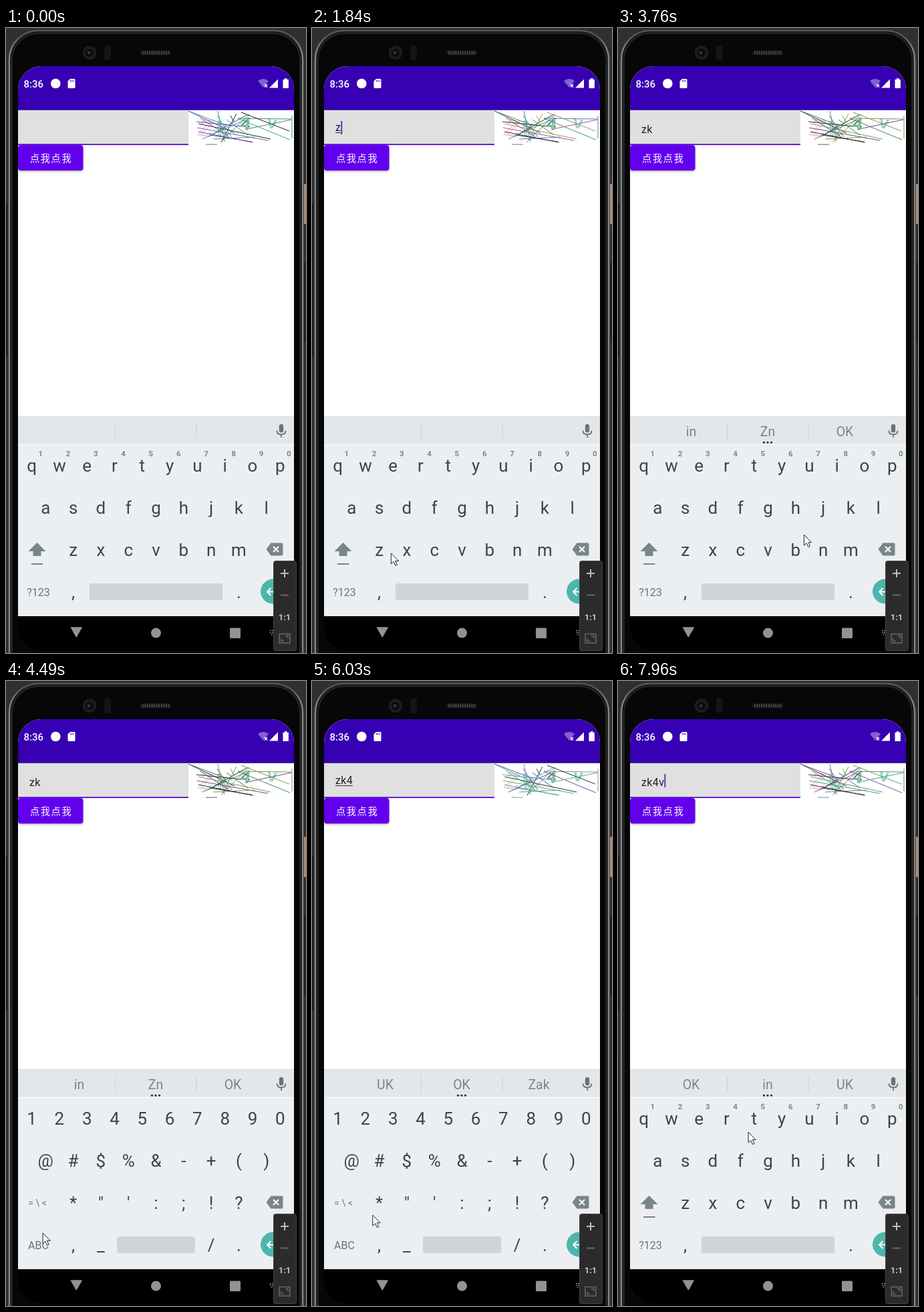
Write an HTML page that moves like this. It is 449x934 px and loops after 8000 ms.

```html
<!DOCTYPE html>
<html lang="zh">
<head>
<meta charset="utf-8">
<title>Verification code input</title>
<style>
html, body { margin: 0; width: 100%; height: 100%; overflow: hidden; background: #303032; }
svg { display: block; width: 449px; height: 934px; font-family: Roboto, sans-serif; }
.key { font-size: 26px; fill: #37474f; text-anchor: middle; }
.hint { font-size: 11.5px; font-weight: 600; fill: #7b868b; text-anchor: middle; }
.mode { font-size: 16px; fill: #69757b; text-anchor: middle; }
.sug { font-size: 19.5px; fill: #7a8387; text-anchor: middle; }
.input { font-size: 16px; letter-spacing: .4px; fill: #202020; }
</style>
</head>
<body>
<svg viewBox="0 0 449 934">
  <defs>
    <linearGradient id="rim" x2="1" y2="0">
      <stop offset="0" stop-color="#858585"/><stop offset=".04" stop-color="#555"/>
      <stop offset=".96" stop-color="#555"/><stop offset="1" stop-color="#858585"/>
    </linearGradient>
    <clipPath id="screen"><rect x="18" y="57" width="413" height="873" rx="35"/></clipPath>
    <filter id="lift" x="-20%" y="-20%" width="140%" height="140%">
      <feDropShadow dx="0" dy="1.5" stdDeviation="1.5" flood-opacity=".3"/>
    </filter>
  </defs>

  <!-- device -->
  <rect width="449" height="934" fill="#303032"/>
  <rect x="446" y="233" width="3" height="60" fill="#b08e78"/>
  <path d="M447.5 350v120M1 262v230" stroke="#1b1b1c" stroke-width="2"/>
  <rect x="5" y="4" width="439" height="980" rx="43" fill="#070707" stroke="url(#rim)" stroke-width="2.5"/>
  <rect x="8.5" y="7.5" width="432" height="973" rx="40" fill="none" stroke="#222" stroke-width="3"/>
  <circle cx="125" cy="37" r="10.5" fill="#1c1c1d"/>
  <circle cx="125" cy="37" r="6" fill="#0c0c0e"/>
  <circle cx="124" cy="37" r="2.3" fill="#35373b"/>
  <rect x="147" y="26" width="10" height="22" rx="4" fill="#151516"/>
  <rect x="201" y="33.5" width="46" height="7" rx="3.5" fill="#1a1a1a"/>
  <path d="M204 37h41" stroke="#4b4b4b" stroke-width="5" stroke-dasharray="1.5 2"/>

  <g clip-path="url(#screen)">
    <rect x="18" y="57" width="413" height="822" fill="#fff"/>
    <rect x="18" y="57" width="413" height="65.5" fill="#3700b3"/>
    <path d="M18 122h413" stroke="#2c0794"/>
    <text x="26.5" y="89" font-size="15" font-weight="500" fill="#fff">8:36</text>
    <circle cx="74.3" cy="83" r="7.3" fill="#fff"/>
    <path d="M96 76h6q1.5 0 1.5 1.500v11q0 1.500-1.500 1.500h-8q-1.500 0-1.500-1.500v-9z" fill="#fff"/>
    <path d="M96.500 78v2.500M98.700 78v2.500M101 78v2.500" stroke="#3700b3"/>
    <path d="M377 79q8-6 16 0l-8 10z" fill="#8062cd"/>
    <path d="M387 84l4 4.500m0-4.500l-4 4.500" stroke="#fff" stroke-width="1.300"/>
    <path d="M394 89.500L407 76.500v13z" fill="#fff"/>
    <path d="M414.500 77h2.300v-1.800h3.800V77h2.300v13h-8.400z" fill="#fff"/>

    <!-- form -->
    <rect x="18" y="123" width="255" height="51" fill="#e0e0e0"/>
    <rect x="18" y="173" width="255" height="2" fill="#6420d8"/>
    <rect x="18" y="175" width="97.500" height="38" rx="4" fill="#6200ee" filter="url(#lift)"/>
    <text x="36" y="200" font-size="14.300" letter-spacing="1.500" fill="#fff" style="font-family:'Noto Sans CJK SC','Noto Sans CJK',sans-serif">点我点我</text>
    <text id="input" class="input" x="35"></text>
    <path id="under" stroke="#333" stroke-width="1"/>
    <rect id="caret" y="139" width="2" height="20" fill="#6430d0"/>
    <g id="captcha" fill="none"></g>

    <!-- keyboard -->
    <rect x="18" y="580" width="413" height="299" fill="#eceff1"/>
    <rect x="18" y="580" width="413" height="42" fill="#e4e7e9"/>
    <path d="M18 580.500h413" stroke="#d9dcde"/>
    <path d="M18 622.500h413" stroke="#f8fafb" stroke-width="1.500"/>
    <path d="M163.500 590v24.500M285 590v24.500" stroke="#cdd1d4"/>
    <rect x="408.800" y="592" width="6.400" height="12.500" rx="3.200" fill="#697479"/>
    <path d="M405.500 601.500q0 6 6.500 6t6.500-6M412 607.500v4.500" fill="none" stroke="#697479" stroke-width="1.800"/>
    <g id="sugs"></g>
    <rect id="press" x="21" y="822" width="56" height="44" rx="4" fill="#dce0e2"/>
    <g id="letters">
      <path d="M46.500 769l13 13h-7v7h-12v-7h-7z" fill="#78858a"/>
      <path d="M38 801h17.500" stroke="#78858a" stroke-width="1.800"/>
      <rect x="125" y="830" width="199" height="25" rx="3" fill="#d0d4d7"/>
    </g>
    <g id="symbols"><rect x="166" y="830" width="117" height="25" rx="3" fill="#d0d4d7"/></g>
    <path d="M389.500 779l7-9.500h16q2 0 2 2v15q0 2-2 2h-16z" fill="#78858a"/>
    <path d="M400 775l8 8m0-8l-8 8" stroke="#fff" stroke-width="2"/>
    <circle cx="399.500" cy="842" r="18.500" fill="#4db6ac"/>
    <path d="M405 842.500h-14m5.500-5.500l-5.500 5.500 5.500 5.500" fill="none" stroke="#fff" stroke-width="2"/>
    <g id="pop">
      <rect x="-26" y="-101" width="52" height="74" rx="3" fill="#f1f3f4" filter="url(#lift)"/>
      <text class="key" y="-55"></text>
    </g>

    <!-- navigation -->
    <rect x="18" y="879" width="413" height="55" fill="#000"/>
    <path d="M97.500 896h15.500l-7.800 13.500z" fill="#929292" stroke="#929292" stroke-linejoin="round" stroke-width="1.500"/>
    <circle cx="224.500" cy="904" r="7.500" fill="#929292"/>
    <rect x="335" y="896.500" width="16" height="15.500" rx="1.500" fill="#929292"/>
    <path d="M395 900.500h6m-6 3h6m-4 3h4" stroke="#aaa" stroke-width="1.500" stroke-dasharray="1.500 1.500"/>
  </g>

  <!-- emulator toolbar -->
  <rect x="400.500" y="796.500" width="34" height="134" rx="3" fill="#2b2b2b" stroke="#444"/>
  <path d="M411 815h12m-6-6v12" stroke="#bdbdbd" stroke-width="2"/>
  <path d="M411 847.500h12" stroke="#686868" stroke-width="2"/>
  <text x="417" y="885" font-size="13" font-weight="700" fill="#c0c0c0" text-anchor="middle">1:1</text>
  <path d="M409 905.500h16v13.500h-16zM412 912v4h4M418 908.500h4v4" fill="none" stroke="#686868" stroke-width="1.500"/>

  <path id="mouse" d="M0 0V16L3.800 12.500 6.500 18.500 9 17.300 6.400 11.600H11.300Z" fill="#fff" stroke="#222" stroke-width="1" stroke-linejoin="round"/>
</svg>
<script>
const $ = id => document.getElementById(id);
const LOOP = 8000, STEP = 41.3;

function add(parent, tag, attrs, text) {
  const el = document.createElementNS('http://www.w3.org/2000/svg', tag);
  for (const k in attrs) el.setAttribute(k, attrs[k]);
  if (text) el.textContent = text;
  parent.appendChild(el);
  return el;
}

function keyRow(group, keys, x0, y) {
  [...keys].forEach((c, i) => {
    if (c !== ' ') add(group, 'text', { class: 'key', x: x0 + i * STEP, y }, c);
  });
}

const letters = $('letters'), symbols = $('symbols');
[[letters, 'qwertyuiop', 'asdfghjkl', 'zxcvbnm', ',     .', '?123'],
 [symbols, '1234567890', '@#$%&-+()', '*"\':;!?', ',_   /.', 'ABC']].forEach(([g, a, b, c, d, mode]) => {
  keyRow(g, a, 38.6, 663);
  keyRow(g, b, 59.3, 726);
  keyRow(g, c, 100.6, 789);
  keyRow(g, d, 100.6, 852);
  add(g, 'text', { class: 'mode', x: 48.5, y: 848.5 }, mode);
});
[...'1234567890'].forEach((c, i) => add(letters, 'text', { class: 'hint', x: 51.7 + i * STEP, y: 640 }, c));
add(symbols, 'text', { class: 'mode', x: 47, y: 785, style: 'font-size:14px' }, '= \\ <');

const sugs = [109.5, 224, 339.5].map(x => add($('sugs'), 'text', { class: 'sug', x, y: 610 }));
[218.5, 224, 229.5].forEach(cx => add($('sugs'), 'circle', { cx, cy: 619.3, r: 1.6, fill: '#333' }));

// Captcha: fixed glyphs and strokes, recoloured after each keystroke
const cap = $('captcha');
const glyph = (c, x, y, turn, style) =>
  add(cap, 'text', { transform: `translate(${x} ${y}) rotate(${turn})`, style }, c);
glyph('Z', 287, 160, 8, 'font:italic 37px "Liberation Serif",serif;stroke:#f3c6dc;stroke-width:1.3');
glyph('k', 317, 161, -6, 'font:30px "Liberation Sans",sans-serif;stroke:#58aaa7;stroke-width:.9');
glyph('4', 351, 150, 10, 'font:26px "Liberation Serif",serif;stroke:#5b9d79;stroke-width:1.4');
glyph('v', 390, 149, 8, 'font:bold 26px "Liberation Sans",sans-serif;fill:#9ad4c9');

const strokes = [
  [273, 124, 342, 157], [273, 124, 329, 145], [317, 124, 327, 170], [345, 128, 322, 171],
  [364, 129, 324, 168], [288, 143, 396, 166], [286, 149, 392, 168], [288, 155, 370, 171],
  [290, 134, 337, 165], [303, 162, 362, 129], [294, 166, 358, 137], [310, 166, 372, 163],
  [347, 135, 425, 167], [347, 135, 427, 136], [352, 126, 424, 154], [361, 151, 427, 137],
  [336, 131, 341, 140], [299, 174, 316, 174], [285, 140, 352, 147], [316, 131, 338, 163],
  [306, 160, 368, 170], [330, 137, 362, 160], [428, 131, 428, 165]
].map(([x1, y1, x2, y2]) => add(cap, 'line', { x1, y1, x2, y2, 'stroke-width': 1 }));
const palettes = [
  ['#6f3fae', '#222', '#38a5a0', '#6b7480', '#3b9a61'],
  ['#333', '#a59a4a', '#379b61', '#a955b4', '#4a7eb5'],
  ['#263328', '#72a04a', '#3d8360', '#6b4a86', '#8b8c58'],
  ['#3fb5a2', '#333', '#7948ad', '#4eb86a', '#89908e'],
  ['#333', '#61a34c', '#8150a0', '#38a392', '#777f8c']
];

// Each edit: time, value, caret x, key (label, x, row y), suggestions
const edits = [
  { at: 0, text: '', x: 35 },
  { at: 1640, text: 'z', x: 43.3, key: ['z', 100.6, 780], composing: true },
  { at: 2990, text: 'zk', x: 51.7, key: ['k', 348.4, 717], words: ['in', 'Zn', 'OK'] },
  { at: 5530, text: 'zk4', x: 61, key: ['4', 162.5, 654], words: ['UK', 'OK', 'Zak'], composing: true },
  { at: 7700, text: 'zk4v', x: 69.3, key: ['v', 224.5, 780], words: ['OK', 'in', 'UK'] }
];
const blinks = [320, 820, 1320, 2140, 2760, 3490, 3990, 4490, 4990, 6030, 6570, 7070, 7560];
const moves = [
  [320, 320, 934], [600, 282, 872], [1110, 153, 783], [1370, 104, 783], [1770, 104, 783],
  [1840, 118, 785], [2360, 311, 735], [2560, 346, 725], [3690, 346, 725], [3760, 279, 757],
  [4160, 46, 847], [4400, 46, 847], [4560, 62, 808], [5000, 155, 672], [5160, 160, 665],
  [5700, 160, 665], [6030, 91, 798], [6100, 80, 805], [6430, 43, 848], [6700, 43, 848],
  [7360, 188, 799], [7560, 222, 786], [7760, 222, 786], [7960, 195, 674]
];

function mouseAt(t) {
  const i = moves.findIndex(m => m[0] > t);
  if (i < 0) return moves[moves.length - 1].slice(1);
  if (i === 0) return [320, 950];
  const [t0, x0, y0] = moves[i - 1], [t1, x1, y1] = moves[i], p = (t - t0) / (t1 - t0);
  return [x0 + (x1 - x0) * p, y0 + (y1 - y0) * p];
}

const show = (el, on) => el.style.display = on ? '' : 'none';
const within = (t, a, b) => t >= a && t < b;
let shown = -1;

function applyEdit(n) {
  const e = edits[n], y = e.composing ? 154 : 157;
  $('input').textContent = e.text;
  $('input').setAttribute('y', y);
  $('under').setAttribute('d', e.composing ? `M35 ${y + 2.5}H${e.x}` : '');
  $('caret').setAttribute('x', e.x);
  show($('sugs'), e.words);
  if (e.words) sugs.forEach((s, i) => s.textContent = e.words[i]);
  if (e.key) {
    $('pop').setAttribute('transform', `translate(${e.key[1]} ${e.key[2]})`);
    $('pop').lastElementChild.textContent = e.key[0];
  }
  strokes.forEach((s, i) => s.setAttribute('stroke', palettes[n][(i * 7 + (i >> 2)) % 5]));
  shown = n;
}

function draw(now) {
  const t = now % LOOP;
  let n = edits.length - 1;
  while (edits[n].at > t) n--;
  if (n !== shown) applyEdit(n);

  // Typing restarts the blink with the caret on
  const since = edits[n].at;
  const toggles = blinks.filter(b => b > since && b <= t).length;
  show($('caret'), toggles % 2 === (n ? 0 : 1));

  const sym = within(t, 4400, 6570);
  show(symbols, sym);
  show(letters, !sym);
  show($('press'), within(t, 4300, 4460) || within(t, 6520, 6630));
  show($('pop'), n > 0 && t - since < 130);
  $('mouse').setAttribute('transform', `translate(${mouseAt(t)})`);
}

const start = performance.now();
function tick() {
  draw(performance.now() - start);
  requestAnimationFrame(tick);
}
tick();
</script>
</body>
</html>
```
